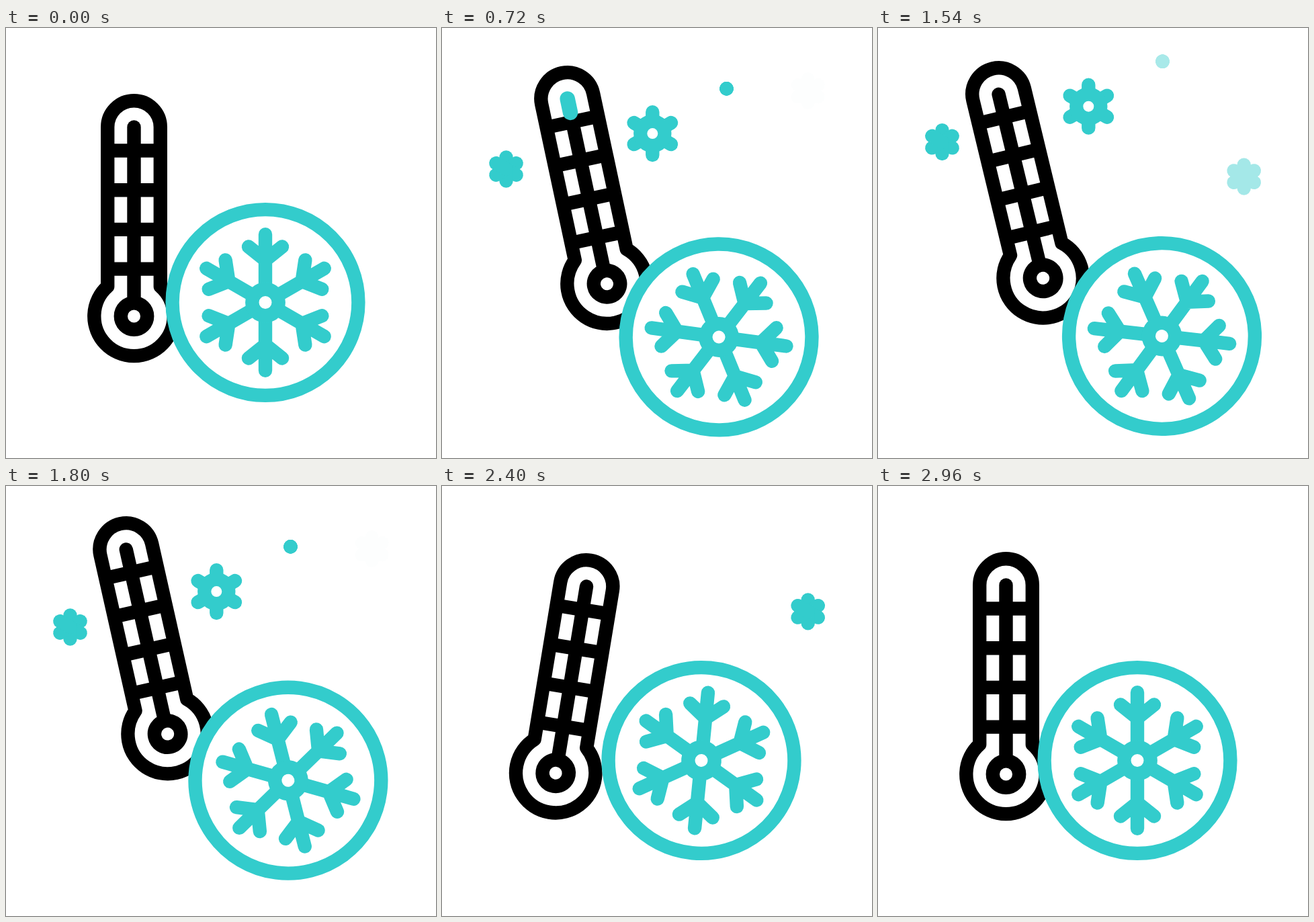
Write an HTML page that moves like this. It is 640x640 px and loops after 3.1 s.

```html
<!DOCTYPE html>
<html>
<head>
<meta charset="utf-8">
<style>
html, body { margin: 0; width: 100%; height: 100%; overflow: hidden; background: #fff; }
svg { display: block; width: 100vw; height: 100vh; }
g { fill: none; stroke-width: 20.4; stroke-linecap: round; stroke-linejoin: round; }
.ink { stroke: #000; }
.ice { stroke: #33cccc; }
.hole { fill: #fff; stroke: none; }
</style>
</head>
<body>
<svg viewBox="0 0 640 640">
  <!-- drawn around the thermometer's pivot -->
  <g id="thermo" class="ink">
    <path d="M-39.3 86.7V-150.5a39.3 39.3 0 0 1 78.6 0V86.7A59.2 59.2 0 1 1-39.3 86.7Z"/>
    <path stroke-linecap="butt" d="M-39 -115.5h78m-78 58.7h78m-78 58.7h78m-78 58.7h78"/>
    <path d="M0 -150.5V111"/>
    <circle cy="131" r="19.7" fill="#fff"/>
    <path id="chill" class="ice" stroke-width="22.5"/>
  </g>
  <g id="badge" class="ice">
    <circle r="138.4" fill="#fff"/>
    <g id="crystal"></g>
    <circle r="19.7" fill="#fff"/>
  </g>
  <g id="snow" class="ice"></g>
</svg>
<script>
const LOOP = 3100, CYCLE = 1080, LIFE = 900, FADE = 180, DROP = 140;
const $ = id => document.getElementById(id);
const clamp = x => Math.max(0, Math.min(1, x));
const ramp = (a, b, t) => clamp((t - a) / (b - a));
const smooth = (a, b, t) => { const p = ramp(a, b, t); return p * p * (3 - 2 * p); };
const mix = (a, b, p) => a + (b - a) * p;
const bezier = (a, b, c, d, p) => {
  const q = 1 - p;
  return a * q * q * q + 3 * p * q * (b * q + c * p) + d * p * p * p;
};

const spokes = d => Array.from({ length: 6 }, (_, i) =>
  `<path d="${d}" transform="rotate(${i * 60})"/>`).join('');

$('crystal').innerHTML = spokes('M0 -20V-101.3M-25 -83L0 -63L25 -83');

function flake(x, y, birth, arm, hole) {
  const g = document.createElementNS('http://www.w3.org/2000/svg', 'g');
  g.innerHTML = spokes(`M0 0V${-arm}`) +
    (hole ? `<circle r="18"/><circle class="hole" r="${hole}"/>` : '');
  $('snow').append(g);
  return { g, x, y, birth };
}
const flakes = [
  flake(313.3, 60.5, 100, 32, 8),
  flake(95.5, 135.2, 240, 17.5),
  flake(544.7, 93.4, 720, 17.5),
  flake(423.5, 38, 385, 0.01)
];

// Each part swings out along a curve, drifts slowly, swings back and settles.
// Points are offsets from home; the middle two of a swing are control points.
const thermo = {
  el: $('thermo'), home: [190.5, 298], tilt: [-11.9, -13.9, 10],
  out: { from: 200, to: 630, path: [[0, 0], [22, -6.5], [31, -21], [28, -44.5]] },
  back: { from: 1720, to: 2315, path: [[23.7, -54.7], [8, -73], [-5, 14], [0, 0]] }
};
const badge = {
  el: $('badge'), home: [386, 408.5], tilt: [-22, -23.6, 6],
  out: { from: 100, to: 520, path: [[0, 0], [9.7, 31.3], [17.6, 48.6], [23.5, 51.8]] },
  back: { from: 1540, to: 2235, path: [[36.5, 50], [50, 26.5], [0.5, 10], [0, 0]] }
};

function pose({ el, home, tilt, out, back }, t) {
  const leave = smooth(out.from, out.to, t);
  const drift = ramp(out.to, back.from, t);
  const home2 = smooth(back.from, back.to, t);
  const along = ({ path }, i, p) => bezier(...path.map(pt => pt[i]), p);
  const [x, y] = [0, 1].map(i => home[i] + (t < back.from
    ? along(out, i, leave) + drift * (back.path[0][i] - out.path[3][i])
    : along(back, i, home2)));
  const held = leave * mix(tilt[0], tilt[1], drift);
  const angle = mix(held, tilt[2], home2) * (1 - smooth(2300, 2960, t));
  el.setAttribute('transform', `translate(${x} ${y}) rotate(${angle})`);
}

function draw(t) {
  pose(thermo, t);
  pose(badge, t);

  const len = 173 * smooth(630, 1050, t) * (1 - smooth(1080, 1500, t));
  $('chill').setAttribute('d', len > 0.5 ? `M0 -150.5v${len}` : '');

  for (const { g, x, y, birth } of flakes) {
    const age = t < birth + CYCLE ? t - birth : t - birth - CYCLE;
    g.setAttribute('opacity', clamp(Math.min(age, LIFE - age) / FADE));
    g.setAttribute('transform', `translate(${x} ${y + DROP * age / LIFE})`);
  }
}

const start = performance.now();
function tick() {
  draw((performance.now() - start) % LOOP);
  requestAnimationFrame(tick);
}
tick();
</script>
</body>
</html>
```
